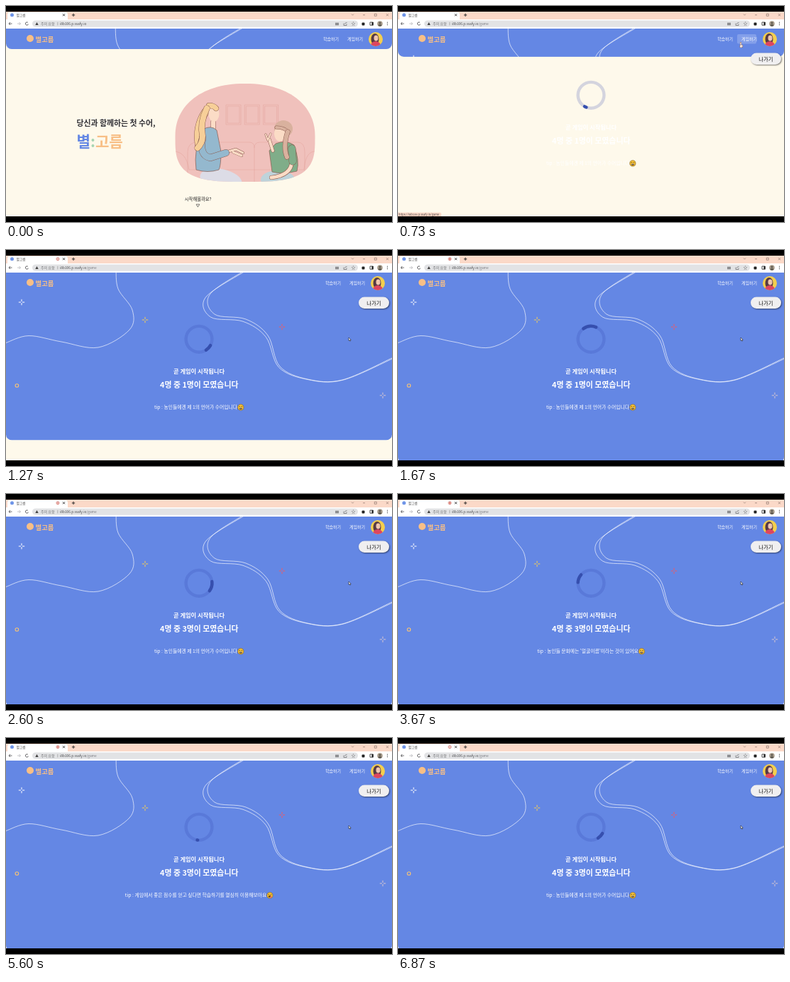
Recreate the animation shown at these times as an HTML page with a canvas. Size 544x306 px, loop 6940 ms.

```html
<!DOCTYPE html>
<html lang="ko">
<head>
<meta charset="utf-8">
<title>별고름</title>
<style>
html, body { margin: 0; width: 100%; height: 100%; overflow: hidden; background: #000; }
canvas { display: block; width: 544px; height: 306px; }
</style>
</head>
<body>
<canvas id="stage"></canvas>
<script>
const LOOP = 6940, W = 544, H = 306;
const FONT = '"Noto Sans CJK KR", "Noto Sans CJK", "Noto Sans", sans-serif';
const BLUE = '#6487e4', CREAM = '#fef9eb', PEACH = '#fbd9c8', ORANGE = '#f8bf86';
const SKIN = '#fbdcc6', LINE = '#8c5c50', INK = '#4a4a4d';
const SWITCH = 640, GROW = 665, TIP_TIME = 2020;
const TIPS = [
  'tip : 농인들에겐 제 1의 언어가 수어입니다',
  "tip : 농인들 문화에는 '얼굴이름'이라는 것이 있어요",
  'tip : 게임에서 좋은 점수를 얻고 싶다면 학습하기를 열심히 이용해보아요'
];

const canvas = document.getElementById('stage');
const c = canvas.getContext('2d');
const dpr = window.devicePixelRatio || 1;
canvas.width = W * dpr;
canvas.height = H * dpr;

const clamp = x => Math.max(0, Math.min(1, x));
const smooth = x => { x = clamp(x); return x * x * (3 - 2 * x); };

function text(s, x, y, size, color, weight = 400, align = 'left') {
  c.font = `${weight} ${size}px ${FONT}`;
  c.textAlign = align;
  c.fillStyle = color;
  c.fillText(s, x, y);
  return c.measureText(s).width;
}

function rect(x, y, w, h, color) {
  c.fillStyle = color;
  c.fillRect(x, y, w, h);
}

function round(x, y, w, h, r, color) {
  c.beginPath();
  c.roundRect(x, y, w, h, r);
  c.fillStyle = color;
  c.fill();
}

function oval(x, y, rx, ry, color, tilt = 0) {
  c.beginPath();
  c.ellipse(x, y, rx, ry, tilt, 0, Math.PI * 2);
  c.fillStyle = color;
  c.fill();
}

const dot = (x, y, r, color) => oval(x, y, r, r, color);

function arc(x, y, r, color, width, from = 0, sweep = 360) {
  c.beginPath();
  c.arc(x, y, r, from * Math.PI / 180, (from + sweep) * Math.PI / 180);
  c.strokeStyle = color;
  c.lineWidth = width;
  c.stroke();
}

function shape(d, fill, stroke, width = 0.7) {
  const p = d instanceof Path2D ? d : new Path2D(d);
  if (fill) { c.fillStyle = fill; c.fill(p); }
  if (stroke) { c.strokeStyle = stroke; c.lineWidth = width; c.stroke(p); }
}

// Outlined round-ended stroke for arms and hair
function limb(d, width, color) {
  c.lineCap = c.lineJoin = 'round';
  shape(d, null, LINE, width + 1);
  shape(d, null, color, width);
  c.lineCap = 'butt';
  c.lineJoin = 'miter';
}

// Catmull-Rom curve through [x, y] points
function curve(pts) {
  const at = i => pts[Math.max(0, Math.min(pts.length - 1, i))];
  c.beginPath();
  c.moveTo(...pts[0]);
  for (let i = 0; i < pts.length - 1; i++) {
    const [a, b, d, e] = [-1, 0, 1, 2].map(k => at(i + k));
    c.bezierCurveTo(b[0] + (d[0] - a[0]) / 6, b[1] + (d[1] - a[1]) / 6,
      d[0] - (e[0] - b[0]) / 6, d[1] - (e[1] - b[1]) / 6, d[0], d[1]);
  }
  c.strokeStyle = '#fff';
  c.lineWidth = 0.65;
  c.stroke();
}

// cubic-bezier(.25, .1, .25, 1)
function ease(x) {
  const bez = (a, b, s) => 3 * a * s * (1 - s) ** 2 + 3 * b * s * s * (1 - s) + s ** 3;
  let lo = 0, hi = 1;
  for (let i = 0; i < 24; i++) {
    const m = (lo + hi) / 2;
    if (bez(0.25, 0.25, m) < clamp(x)) lo = m; else hi = m;
  }
  return bez(0.1, 1, lo);
}

function browser(t) {
  rect(0, 8, W, 12, PEACH);
  round(2, 9, 85, 12, [3, 3, 0, 0], '#fff');
  rect(0, 19, W, 13, '#fff');
  dot(8.5, 12.8, 2.5, '#6f95e8');
  text('별고름', 14.5, 14.6, 4.8, '#555');
  if (t > 950) {
    arc(73, 12.7, 2, '#c75146', 0.7);
    dot(73, 12.7, 1.1, `rgba(205,60,50,${0.65 + 0.35 * Math.cos(t / 320)})`);
  }
  shape('M80 11.2l3 3m0-3l-3 3M95 10.6v4.4m-2.2-2.2h4.4', null, '#222', 0.9);
  shape('M487 11.6l1.5 1.5 1.5-1.5M503 12.7h3M519.3 11.2h3v3h-3zM536 11.2l3 3m0-3l-3 3', null, '#8b746c');

  shape('M8.5 25h-4.5m2-2l-2 2 2 2', null, INK, 0.8);
  shape('M16 25h4.5m-2-2l2 2-2 2', null, '#b3b3b6', 0.8);
  arc(29.5, 25, 2.1, INK, 0.9, 20, 290);

  round(37, 20.5, 459, 9.2, 4.6, '#e2e3e5');
  shape('M43.5 23l2.2 4h-4.4z', '#444');
  text('주의 요함', 49, 26.9, 5, '#707275');
  rect(72.6, 22.8, 0.6, 4.6, '#888');
  const w = text('i8b106.p.ssafy.io', 76, 26.9, 4.8, '#484a4d');
  if (t >= SWITCH) text('/game', 76 + w, 26.9, 4.8, '#7a7c80');
  rect(464, 24, 5, 1, INK);
  rect(464, 26, 5, 1, INK);
  shape('M476 24.5v3h4v-2M477.5 25.5q.3-2 3-2', null, INK, 0.6);
  text('☆', 489.5, 27.2, 6, INK, 400, 'center');
  round(501.5, 23.6, 4, 4, 1, '#222');
  shape('M513 23h4.4v4.2h-4.4z', null, '#222', 0.8);
  rect(515.5, 23, 2, 4.2, '#222');
  dot(527, 25.1, 3.8, '#a99d8c');
  dot(527, 24, 1.5, '#5f5a50');
  oval(527, 27.4, 2.5, 1.3, '#5f5a50');
  for (let i = 0; i < 3; i++) dot(537.5, 23.2 + i * 1.8, 0.6, INK);
}

function cross(x, y, color) {
  for (let i = 0; i < 4; i++) {
    c.save();
    c.translate(x, y);
    c.rotate(i * Math.PI / 2);
    rect(1, -0.5, 3.2, 1, color);
    c.restore();
  }
}

function banner(bottom, scale = 1) {
  c.save();
  c.beginPath();
  c.roundRect(0, 32, W, bottom - 32, [0, 0, 8, 8]);
  c.clip();
  rect(0, 32, W, bottom - 32, BLUE);
  c.scale(scale, 1);
  curve([[155, 26], [158, 55], [178, 85], [174, 113], [130, 138], [78, 130], [32, 121.5], [0, 131.5]]);
  const river = [[345, 24], [288, 62], [294, 91], [338, 98], [369, 121], [386, 165], [425, 183], [474, 184], [544, 153]];
  curve(river);
  curve(river.map(([x, y], i) => [x - 8 * Math.max(0, 1 - i / 6), y + 6 * Math.abs(1 - i / 6.5)]));
  cross(22, 74, '#fff');
  cross(196, 99, '#f5cf55');
  cross(389, 109, '#ee5a64');
  cross(531, 206, '#d8c7cf');
  arc(15.4, 192, 2.3, '#f3c177', 1.1);
  c.restore();
}

function avatar(x, y) {
  c.save();
  c.beginPath();
  c.arc(x, y, 10, 0, Math.PI * 2);
  c.clip();
  c.translate(x, y);
  rect(-10, -10, 20, 20, '#f4cf4e');
  oval(-1, 0, 5.5, 8, '#563a45');
  oval(0, 9, 7, 6, '#dc4660');
  oval(0.5, -1.5, 3, 4, '#f0c6ae');
  c.restore();
}

function nav(t) {
  const dx = t < SWITCH ? -3 : 0;
  dot(34, 46, 5, ORANGE);
  text('별고름', 41.5, 50.6, 9.4, ORANGE, 700);
  if (t > 520 && t < 800) round(478 + dx, 40, 27, 13.5, 2, '#839fea');
  text('학습하기', 450 + dx, 49.2, 6, '#fff', 500);
  text('게임하기', 484 + dx, 49.2, 6, '#fff', 500);
  avatar(524 + dx, 47);
}

// Superellipse, rounder above its middle than below
function blob() {
  const p = new Path2D();
  for (let a = 0; a < 360; a += 3) {
    const s = Math.sin(a * Math.PI / 180), q = Math.cos(a * Math.PI / 180);
    const n = s < 0 ? 2.2 : 3.3, r = s < 0 ? 75 : 64;
    p.lineTo(337 + 98.5 * Math.sign(q) * Math.abs(q) ** (2 / n), 185 + r * Math.sign(s) * Math.abs(s) ** (2 / n));
  }
  p.closePath();
  return p;
}

function illustration() {
  const wall = '#e3a09a', hair = '#f7cf98', denim = '#94b8ce', green = '#80ad89', brown = '#d9b19e';
  const frame = blob();
  shape(frame, '#f0c1bc');
  c.save();
  c.clip(frame);
  for (let i = 0; i < 3; i++)
    shape(`M${310 + i * 26.3} 140h21v28h-21zm2 2h17v24h-17z`, null, wall, 0.5);
  shape('M256 249V207q0-14 14-14h73q7 0 7 8v48m0-48q0-8 8-8h53q10 0 10 14v42M236 206q18 0 22 26h162q2-28 18-26', null, wall, 0.5);

  // woman
  oval(303, 246, 30, 15, '#dcdce6', 0.2);
  limb('M281 150Q267 172 272 198', 10, hair);
  limb('M292 164v14', 6, SKIN);
  oval(293, 153, 7.5, 11, SKIN);
  limb('M286 141Q293 141 296 145', 7, hair);
  shape('M277 175q12-7 20 1l6 30q0 20-3 26-16 5-32 0-4-28 9-57z', denim, LINE);
  limb('M310 207l14-4 10 5m-14-1l12 5', 3, SKIN);
  limb('M277 187Q272 212 288 215L310 208', 9, denim);
  limb('M283 145Q273 165 277 184 277 194 270 201', 8, hair);

  // child
  oval(383, 246, 24, 13, '#bed3da');
  shape('M380 195q14-6 26 2 8 22 4 37-20 5-35 1l-4-30z', green, LINE);
  limb('M371 189l5 16', 4, SKIN);
  limb('M366 182l3 8 4-9', 2, SKIN);
  limb('M403 220Q402 240 374 243', 5, SKIN);
  limb('M403 202l1 18', 10, green);
  oval(391, 174, 13, 12, brown);
  oval(386, 181, 8, 11, SKIN);
  limb('M381 172Q392 172 397 178', 4, brown);
  limb('M397 178Q390 200 396 214', 6, brown);
  c.restore();
}

function home() {
  banner(61, 541 / 544);
  text('당신과 함께하는 첫 수어,', 99.4, 170, 10.9, '#343338', 700);
  let x = 99.5;
  for (const [s, color] of [['별', BLUE], [':', '#a7d5b2'], ['고름', ORANGE]])
    x += text(s, x, 200, 21.2, color, 700);
  illustration();
  text('시작해볼까요?', 270.7, 275.6, 6.3, '#222', 500, 'center');
  shape('M268 281h4.8l-2.4 3.8z', null, '#444');
}

function emoji(x, y, tongue) {
  dot(x, y, 4.3, '#fcc737');
  arc(x, y, 4.1, '#5b4020', 0.5);
  for (const side of [-1, 1]) arc(x + side * 1.6, y - 0.6, 0.8, '#4d3316', 0.7, 180, 180);
  oval(x, y + 1.6, 2.2, 1.3, '#4d3316');
  if (tongue) dot(x + 1.2, y + 2.3, 1.2, '#e7656a');
  else rect(x - 1.7, y + 0.7, 3.4, 0.7, '#fff');
}

function spinner(t) {
  const u = t % 700 / 700;
  arc(272, 126.3, 18.4, 'rgba(45,66,170,.2)', 4.4);
  c.lineCap = 'round';
  arc(272, 126.3, 18.4, '#364fae', 4.4, 95 + 360 * u, 2 + 73 * (1 - Math.abs(2 * u - 1)));
  c.lineCap = 'butt';
}

function game(t) {
  banner(61 + 241 * ease((t - GROW) / 1060));
  spinner(t);
  text('곧 게임이 시작됩니다', 272, 175, 8.25, '#fff', 700, 'center');
  text(`4명 중 ${t < 2500 ? 1 : 3}명이 모였습니다`, 272.2, 194.5, 10.9, '#fff', 700, 'center');
  const k = Math.floor((t - SWITCH) / TIP_TIME) % TIPS.length;
  const w = text(TIPS[k], 267.5, 225.2, 6.8, '#fff', 500, 'center');
  emoji(267.5 + w / 2 + 4.7, 222.9, k === 2);

  c.save();
  c.shadowColor = 'rgba(0,0,0,.5)';
  c.shadowBlur = 2 * dpr;
  c.shadowOffsetX = c.shadowOffsetY = dpr;
  round(497, 66.5, 43, 16.5, 8.2, '#f0eff0');
  c.restore();
  text('나가기', 518.3, 77.6, 7.3, '#111', 400, 'center');
}

function pointer(t) {
  if (t < 300) return;
  c.save();
  c.translate(483, 140 - 87 * smooth((t - 300) / 220) + 72 * smooth((t - 780) / 240));
  if (t > 500 && t < 800) {
    limb('M0-1v3.5', 1.2, '#fff');
    limb('M0 2.5l2 .6-.4 1.8h-2z', 1.2, '#fff');
  } else {
    shape('M0-1v4.4l1-.9.8 1.6.8-.4-.8-1.5h1.4z', '#fff', '#222', 0.6);
  }
  c.restore();
}

function draw(now) {
  const t = now % LOOP;
  c.setTransform(dpr, 0, 0, dpr, 0, 0);
  rect(0, 0, W, H, '#000');
  rect(0, 32, W, 266, CREAM);
  if (t < SWITCH) home(); else game(t);
  nav(t);
  browser(t);
  if (t > 520 && t < 850) {
    round(0, 292.5, 61, 5.5, [0, 2, 0, 0], PEACH);
    text('https://i8b106.p.ssafy.io/game', 1, 297.2, 4, '#54504e');
  }
  pointer(t);
  rect(0, 298, W, 8, '#000');
}

const start = performance.now();
function tick() {
  draw(performance.now() - start);
  requestAnimationFrame(tick);
}
tick();
</script>
</body>
</html>
```
